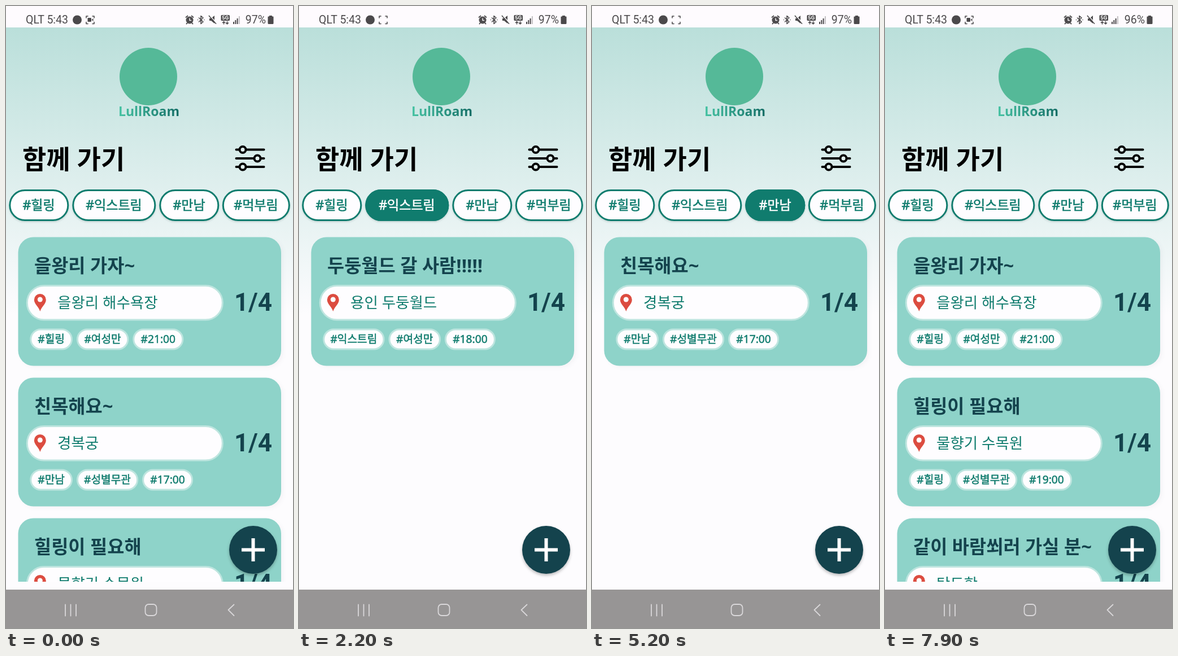
An HTML page that plays this animation: 508x1102 px, repeating every 8000 ms.

```html
<!DOCTYPE html>
<html lang="ko">
<head>
<meta charset="utf-8">
<title>함께 가기</title>
<style>
  html, body { margin: 0; width: 100%; height: 100%; overflow: hidden; background: #fdfcfe; }
  svg { display: block; width: 100%; height: 100%; font-family: "Noto Sans", "Noto Sans CJK KR", "Noto Sans CJK", sans-serif; }
  .status { font: 19.5px Roboto, sans-serif; fill: #4b494b; }
  .line { fill: none; stroke-linecap: round; stroke-linejoin: round; }
  .mid { text-anchor: middle; }
  .chip { font-size: 23px; fill: #107c6e; filter: drop-shadow(0 2px 1.5px rgba(0, 40, 35, .14)); }
  .chip rect { fill: #fefdff; stroke: #107c6e; stroke-width: 3; }
  .chip text { stroke: #107c6e; stroke-width: .6; }
  .chip .on { fill: #fff; }
  .chip .on rect { fill: #107c6e; }
  .chip .on text { stroke: #fff; }
  .card { filter: drop-shadow(4px 3px 3px rgba(60, 40, 70, .04)); }
  .title { font-size: 32.8px; font-weight: 700; fill: #14434d; }
  .place { font-size: 26.5px; font-weight: 300; fill: #107c6e; }
  .count { font: 700 44px Roboto, sans-serif; fill: #14434d; }
  .tag { font-size: 19.2px; fill: #107c6e; stroke: #107c6e; stroke-width: .5; }
  .pill { fill: #fefdff; stroke: #bee5df; stroke-width: 3; }
  .fab { filter: drop-shadow(0 3px 2.5px rgba(0, 0, 0, .25)); }

  /* every state change is a hard cut on the 8 s loop */
  .cut { animation: 8s step-end infinite; }
  .list-all { animation-name: list-all; }
  .list-thrill { animation-name: list-thrill; }
  .list-meet { animation-name: list-meet; }
  .list-heal { animation-name: list-heal; }
  .on-thrill { animation-name: on-thrill; }
  .on-meet { animation-name: on-meet; }
  .on-heal { animation-name: on-heal; }
  .on-food { opacity: 0; }
  .full { animation-name: full; }
  .used { animation-name: used; }
  .nudge { animation-name: nudge; }
  .rec { animation: rec 1s step-end infinite; }
  .rec-last { animation-name: rec-last; }
  @keyframes list-all { 0% { opacity: 1 } 23.75%, 100% { opacity: 0 } }
  @keyframes list-thrill { 0% { opacity: 0 } 23.75% { opacity: 1 } 52.5%, 100% { opacity: 0 } }
  @keyframes list-meet { 0% { opacity: 0 } 52.5% { opacity: 1 } 88.75%, 100% { opacity: 0 } }
  @keyframes list-heal { 0% { opacity: 0 } 88.75%, 100% { opacity: 1 } }
  @keyframes on-thrill { 0% { opacity: 0 } 22.5% { opacity: 1 } 51.25%, 100% { opacity: 0 } }
  @keyframes on-meet { 0% { opacity: 0 } 51.25% { opacity: 1 } 87.5%, 100% { opacity: 0 } }
  @keyframes on-heal { 0% { opacity: 0 } 87.5% { opacity: 1 } 98.75%, 100% { opacity: 0 } }
  @keyframes full { 0% { opacity: 1 } 76.25%, 100% { opacity: 0 } }
  @keyframes used { 0% { opacity: 0 } 76.25%, 100% { opacity: 1 } }
  @keyframes nudge { 0% { transform: none } 76.25%, 100% { transform: translateX(-1px) } }
  @keyframes rec { 0% { opacity: 1 } 20% { opacity: 0 } 70%, 100% { opacity: 1 } }
  @keyframes rec-last { 0% { opacity: 0 } 95% { opacity: 1 } 96.25%, 100% { opacity: 0 } }
</style>
</head>
<body>
<svg viewBox="0 0 508 1102" preserveAspectRatio="none">
  <defs>
    <linearGradient id="sky" x1="0" y1="0" x2="0" y2="1">
      <stop stop-color="#badfda"/><stop offset="1" stop-color="#fdfcfe"/>
    </linearGradient>
    <linearGradient id="word">
      <stop stop-color="#46c3a3"/><stop offset="1" stop-color="#146e66"/>
    </linearGradient>
    <clipPath id="view"><rect y="395" width="508" height="625"/></clipPath>
    <g id="cam" fill="#4b494b"><rect x="144.5" y="21" width="6.5" height="7" rx="1.2"/><path d="M151.5 24.5l3-2.5v5z"/></g>
  </defs>
  <rect width="508" height="1102" fill="#fdfcfe"/>
  <rect y="38" width="508" height="510" fill="url(#sky)"/>
  <rect width="508" height="38" fill="#fefbfe"/>

  <g class="status">
    <text x="35" y="31">QLT 5:43</text>
    <circle cx="126" cy="24.5" r="8"/>
    <path class="line" stroke="#4b494b" stroke-width="1.6" d="M142 21v-3h3M153 18h3v3M156 28.5v3h-3M145 31.5h-3v-3"/>
    <use href="#cam" class="rec"/>
    <use href="#cam" class="cut rec-last"/>
    <g class="cut nudge">
      <circle cx="325" cy="25" r="5"/>
      <g class="line" stroke="#4b494b" stroke-width="1.8">
        <circle cx="325" cy="25" r="5.6"/>
        <path d="M318.5 20l3-2.5M331.5 20l-3-2.5M320.5 30.5l-1 1M329.5 30.5l1 1"/>
        <path stroke="#fefbfe" stroke-width="1.4" d="M325 22v3.5h2.5"/>
        <path stroke-width="1.6" d="M341.5 21l7.5 7-4 3.5v-14l4 3.5-7.5 7M339.5 24.5h0M351 24.5h0"/>
        <path d="M359.5 17.5l12 13.5"/>
      </g>
      <path d="M360 22h3l6-5v14l-6-5h-3z"/>
      <path stroke="#fefbfe" stroke-width="1.2" d="M361 17l12 13.5"/>
      <rect x="380.5" y="16" width="15.5" height="10" rx="1.5"/>
      <text class="mid" x="388.2" y="24.3" style="font:700 9.5px Roboto,sans-serif;fill:#fff">5G</text>
      <path class="line" stroke="#4b494b" stroke-width="1.5" d="M385.5 32v-4.5m-2 2l2-2 2 2M391.5 27.5v4.5m-2-2l2 2 2-2"/>
      <path d="M402 28h2v4h-2zM405.3 25h2v7h-2zM408.6 22h2v10h-2z"/>
      <path fill="#c3c0c3" d="M411.9 18h2v14h-2z"/>
    </g>
    <text class="cut full" x="460" y="31" text-anchor="end">97%</text>
    <text class="cut used" x="460" y="31" text-anchor="end">96%</text>
    <path d="M466 17h5v1.5h1.5q1 0 1 1v11q0 1.5-1.5 1.5h-7q-1.5 0-1.5-1.5v-11q0-1 1-1h1.5z"/>
  </g>

  <circle cx="252" cy="125" r="51" fill="#55b998"/>
  <text class="mid" x="253" y="195" fill="url(#word)" style="font:700 23px 'Open Sans',sans-serif">LullRoam</text>

  <text x="29" y="287.5" font-size="46" font-weight="700">함께 가기</text>
  <g class="line" stroke="#000" stroke-width="4">
    <path d="M407.5 254.500h49M407.5 270h49M407.5 285h49"/>
    <g fill="#e0f0ee"><circle cx="419" cy="254.5" r="5.5"/><circle cx="445" cy="270" r="5.5"/><circle cx="419" cy="285" r="5.5"/></g>
  </g>

  <g id="chips"></g>
  <g id="lists" clip-path="url(#view)"></g>

  <g class="fab"><circle cx="437.5" cy="963.5" r="42.5" fill="#14434d"/></g>
  <path d="M417 963.5h41M437.5 943v41" stroke="#fff" stroke-width="6"/>

  <rect y="1034" width="508" height="68" fill="#979595"/>
  <g class="line" stroke="#dad8da" stroke-width="1.8">
    <path d="M105 1060.5v20M114.5 1060.5v20M124 1060.5v20M403.5 1060.5l-10 9.500 10 10"/>
    <rect x="246.5" y="1060" width="20" height="20" rx="6"/>
  </g>
</svg>
<script>
  const chips = [
    ['heal', '#힐링', 5, 106],
    ['thrill', '#익스트림', 117, 148],
    ['meet', '#만남', 271, 106],
    ['food', '#먹부림', 382.5, 120]
  ];
  const beach = ['을왕리 가자~', '을왕리 해수욕장', '#힐링', '#여성만', '#21:00'];
  const palace = ['친목해요~', '경복궁', '#만남', '#성별무관', '#17:00'];
  const garden = ['힐링이 필요해', '물향기 수목원', '#힐링', '#성별무관', '#19:00'];
  const park = ['두둥월드 갈 사람!!!!!', '용인 두둥월드', '#익스트림', '#여성만', '#18:00'];
  const harbor = ['같이 바람쐬러 가실 분~', '탄도항', '#힐링', '#성별무관', '#20:00'];
  const lists = {
    all: [beach, palace, garden],
    thrill: [park],
    meet: [palace],
    heal: [beach, garden, harbor]
  };

  const drawChip = ([key, label, x, w]) => {
    const face = `<rect x="${x + 1.8}" y="326.5" width="${w - 3}" height="53" rx="26.5"/>
      <text class="mid" x="${x + w / 2}" y="361">${label}</text>`;
    return `<g class="chip">${face}<g class="on cut on-${key}">${face}</g></g>`;
  };

  const drawTags = tags => {
    let x = 42.3;
    return tags.map(tag => {
      const w = tag.includes(':') ? 90 : 42 + 16.8 * (tag.length - 1);
      const out = `<rect class="pill" x="${x + 1.5}" y="163.5" width="${w - 3}" height="35" rx="17.5"/>
        <text class="tag mid" x="${x + w / 2}" y="187.5">${tag}</text>`;
      x += w + 7;
      return out;
    }).join('');
  };

  const drawCard = ([title, place, ...tags], i) => `<g transform="translate(0 ${409.5 + 249 * i})">
    <rect class="card" x="21.5" width="465.5" height="228" rx="27" fill="#8ed3c9"/>
    <text class="title" x="50" y="62">${title}</text>
    <rect class="pill" x="37.3" y="86" width="346" height="60.5" rx="30"/>
    <path d="M60.3 131.5c-3-9-10.5-13-10.5-20.5a10.5 10.5 0 0 1 21 0c0 7.5-7.5 11.5-10.5 20.5z" fill="#dc4c40"/>
    <circle cx="60.3" cy="110.5" r="4.5" fill="#fff"/>
    <text class="place" x="91" y="125">${place}</text>
    <text class="count mid" x="437.5" y="130">1/4</text>
    ${drawTags(tags)}</g>`;

  document.getElementById('chips').innerHTML = chips.map(drawChip).join('');
  document.getElementById('lists').innerHTML = Object.entries(lists)
    .map(([key, cards]) => `<g class="cut list-${key}">${cards.map(drawCard).join('')}</g>`).join('');
</script>
</body>
</html>
```
